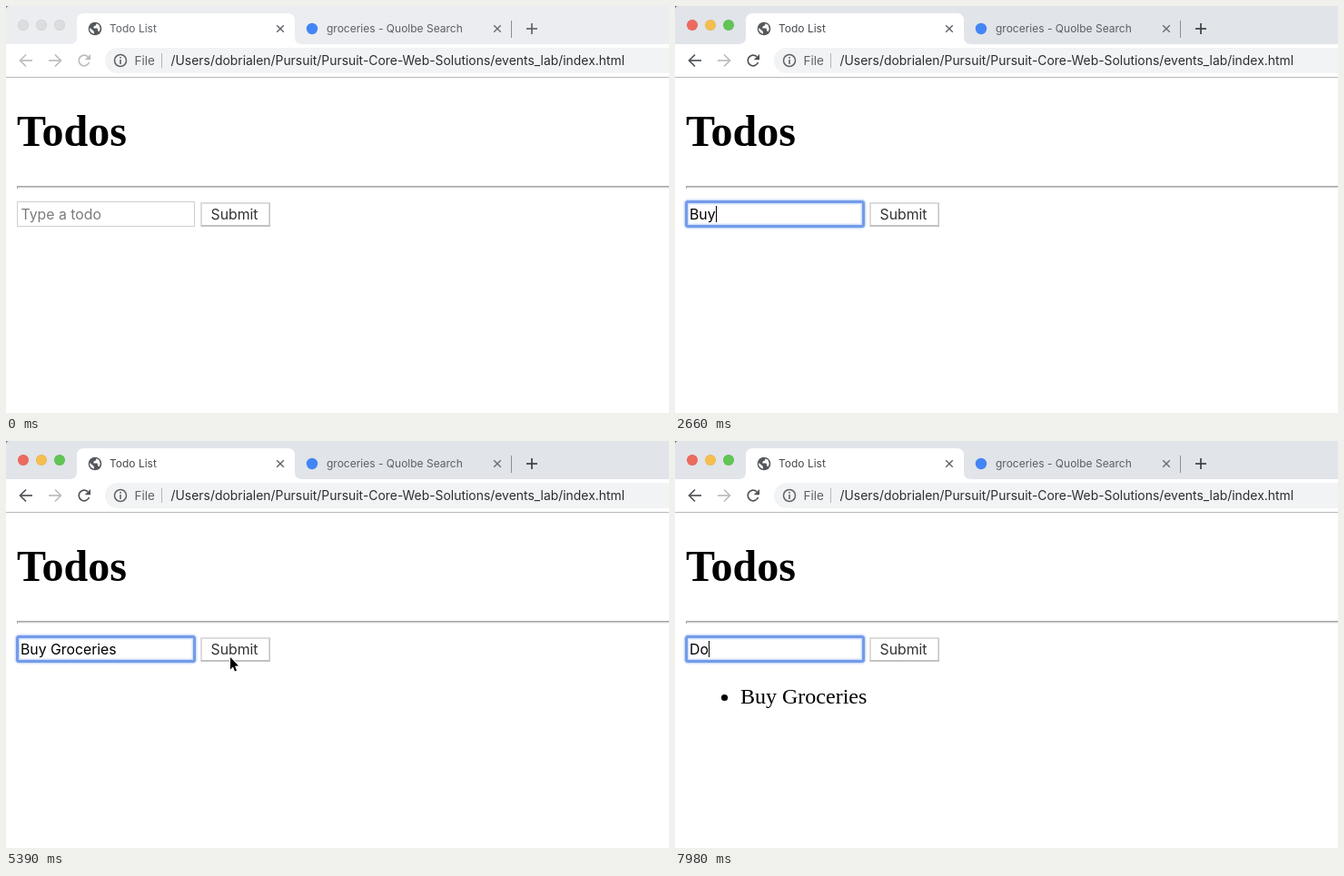
An HTML page with a canvas for the animation above (8 s loop, 730 px wide and 448 px high).

```html
<!DOCTYPE html>
<html lang="en">
<head>
<meta charset="utf-8">
<title>Todo List</title>
<style>
  html, body { margin: 0; width: 100%; height: 100%; overflow: hidden; background: #fff; }
  canvas { display: block; }
</style>
</head>
<body>
<canvas id="stage" width="730" height="448"></canvas>
<script>
const ctx = document.getElementById('stage').getContext('2d');
const LOOP = 8000, STEP = 70;
const SANS = 'Inter, Roboto, sans-serif';
const SERIF = '"Liberation Serif", serif';
const FIELD_FONT = '15.8px ' + SANS;

// Moments of the story, in ms
const ACTIVATE = 840, FOCUS = 1260, PRESS = 5460, SUBMIT = 5530, REFOCUS = 6230;
const FIRST = { text: 'Buy Groceries',
  at: [1820, 2100, 2380, 2800, 3010, 3220, 3430, 3780, 3990, 4130, 4270, 4410, 4550] };
const SECOND = { text: 'Do', at: [7560, 7840] };

// Pointer: time, x, y
const PATH = [
  [70, 600, 414], [280, 575, 285], [420, 568, 283], [770, 134, 226],
  [4760, 134, 226], [5250, 247, 238], [5600, 247, 238], [5880, 188, 237], [6160, 140, 233]
];

function text(str, x, y, font, color) {
  ctx.font = font;
  ctx.fillStyle = color;
  ctx.fillText(str, x, y);
}

function rect(x, y, w, h, color) {
  ctx.fillStyle = color;
  ctx.fillRect(x, y, w, h);
}

function disc(x, y, r, color) {
  ctx.fillStyle = color;
  ctx.beginPath();
  ctx.arc(x, y, r, 0, Math.PI * 2);
  ctx.fill();
}

function line(points, color, width) {
  ctx.strokeStyle = color;
  ctx.lineWidth = width;
  ctx.beginPath();
  points.forEach(([x, y]) => ctx.lineTo(x, y));
  ctx.stroke();
}

function polygon(points, color) {
  ctx.fillStyle = color;
  ctx.beginPath();
  points.forEach(([x, y]) => ctx.lineTo(x, y));
  ctx.closePath();
  ctx.fill();
}

function roundStroke(x, y, w, h, r, width, color) {
  ctx.strokeStyle = color;
  ctx.lineWidth = width;
  ctx.beginPath();
  ctx.roundRect(x, y, w, h, r);
  ctx.stroke();
}

function cross(x, y, color) {
  line([[x - 3.8, y - 3.8], [x + 3.8, y + 3.8]], color, 1.4);
  line([[x - 3.8, y + 3.8], [x + 3.8, y - 3.8]], color, 1.4);
}

function navArrow(x, y, dir, color) {
  line([[x - 7 * dir, y], [x + 6 * dir, y]], color, 1.7);
  line([[x, y - 6.5], [x + 6.5 * dir, y], [x, y + 6.5]], color, 1.7);
}

function reload(x, y, color) {
  ctx.strokeStyle = color;
  ctx.lineWidth = 1.7;
  ctx.beginPath();
  ctx.arc(x, y, 5.8, 0.35, Math.PI * 1.74);
  ctx.stroke();
  polygon([[x + 7, y - 7], [x + 7, y - 0.7], [x + 0.7, y - 0.7]], color);
}

function globe(x, y, color) {
  disc(x, y, 7.3, color);
  polygon([[x - 5.7, y - 1], [x - 2.2, y + 2], [x - 1, y + 3.4], [x - 1, y + 5.8],
    [x - 4, y + 4.2], [x - 5.8, y + 1.5]], '#fff');
  polygon([[x + 1.2, y - 5.8], [x + 1.2, y - 3.8], [x - 1.4, y - 2.6], [x - 1.6, y - 0.6],
    [x + 2.6, y - 0.4], [x + 3.2, y + 2.4], [x + 4.6, y + 3.2], [x + 5.8, y],
    [x + 4.4, y - 4.2]], '#fff');
}

function trafficLights(active) {
  const colors = active ? ['#ec6a5e', '#f4bf4f', '#61c554'] : ['#dcdddf', '#dcdddf', '#dcdddf'];
  const edges = active ? ['#e2635a', '#e6b450', '#5dba52'] : ['#cecfd1', '#cecfd1', '#cecfd1'];
  colors.forEach((color, i) => {
    disc(19 + i * 20, 21, 6, edges[i]);
    disc(19 + i * 20, 21, 5.4, color);
  });
}

function activeTab() {
  ctx.fillStyle = '#fff';
  ctx.beginPath();
  ctx.moveTo(70, 42);
  ctx.quadraticCurveTo(78, 42, 78, 34);
  ctx.lineTo(78, 16);
  ctx.quadraticCurveTo(78, 8, 86, 8);
  ctx.lineTo(310, 8);
  ctx.quadraticCurveTo(318, 8, 318, 16);
  ctx.lineTo(318, 34);
  ctx.quadraticCurveTo(318, 42, 326, 42);
  ctx.fill();
}

function browser(active) {
  const dark = active ? '#3c4043' : '#5f6368';
  const nav = active ? '#505357' : '#babcbe';
  rect(0, 0, 730, 42, active ? '#e1e4e9' : '#ebedf0');
  polygon([[0, 0], [3, 0], [1, 1], [0, 3]], '#77797c');
  trafficLights(active);
  activeTab();

  globe(98, 25, '#55585c');
  text('Todo List', 114, 29, '12px ' + SANS, active ? '#45494d' : '#5f6368');
  cross(302, 25, '#5f6368');
  disc(337, 25, 6.2, '#4285f4');
  text('groceries - Quolbe Search', 353, 29, '12px ' + SANS, '#5b5f64');
  cross(541, 25, '#6a6d71');
  rect(556, 16, 1, 19, '#8b8e93');
  line([[573, 25], [585, 25]], dark, 1.7);
  line([[579, 19], [579, 31]], dark, 1.7);

  navArrow(22, 60, -1, nav);
  navArrow(54, 60, 1, '#babcbe');
  reload(86, 60, nav);
  ctx.fillStyle = '#f1f3f4';
  ctx.beginPath();
  ctx.roundRect(109, 46, 660, 28, 14);
  ctx.fill();
  roundStroke(119.5, 53.5, 13, 13, 6.5, 1.5, '#5f6368');
  rect(125.2, 59, 1.6, 5, '#5f6368');
  rect(125.2, 56, 1.6, 1.7, '#5f6368');
  text('File', 141.5, 65, '13.5px ' + SANS, '#5f6368');
  rect(171, 52, 1, 16, '#b4b7bb');
  text('/Users/dobrialen/Pursuit/Pursuit-Core-Web-Solutions/events_lab/index.html',
    181.5, 65, '13.92px ' + SANS, '#2b2e31');
  rect(0, 78, 730, 1, '#b8b8b8');
}

function typed(entry, t) {
  return entry.text.slice(0, entry.at.filter(at => at <= t).length);
}

function inputState(t) {
  const second = t >= SUBMIT;
  const entry = second ? SECOND : FIRST;
  const start = second ? REFOCUS : FOCUS;
  const lastKey = Math.max(start, ...entry.at.filter(at => at <= t));
  const focused = t >= start && !(t >= PRESS && t < SUBMIT);
  return {
    value: typed(entry, t),
    focused,
    ring: Math.min(1, (t - start + STEP) / (3 * STEP)),
    // The caret gives way while the pointer is in use
    caret: focused && (t < 4760 || second) && Math.floor((t - lastKey) / 500) % 2 === 0
  };
}

function inputField(state) {
  rect(12, 215, 196, 28, '#fff');
  roundStroke(12.5, 215.5, 195, 27, 0, 1, '#cfcfcf');
  if (state.focused) {
    ctx.globalAlpha = state.ring;
    roundStroke(12.5, 215.5, 195, 27, 2, 6, 'rgba(125, 165, 245, 0.35)');
    roundStroke(12.5, 215.5, 195, 27, 2, 3, '#739be8');
    ctx.globalAlpha = 1;
  }
  if (state.value) text(state.value, 16, 235, FIELD_FONT, '#000');
  else text('Type a todo', 16.5, 235, FIELD_FONT, '#7b7b7b');
  if (state.caret) {
    ctx.font = FIELD_FONT;
    rect(Math.round(16 + ctx.measureText(state.value).width), 220, 1, 18, '#000');
  }
}

function submitButton(focused) {
  rect(214, 216, 77, 27, '#dcdcdc');
  rect(290, 217, 1, 26, '#c6c6c6');
  rect(215, 241, 76, 2, '#c2c2c2');
  rect(216, 218, 73, 23, '#fff');
  if (focused) {
    roundStroke(213, 214.5, 79.5, 30, 3, 6, 'rgba(125, 165, 245, 0.4)');
    roundStroke(213, 214.5, 79.5, 30, 3, 4, '#8aacf0');
  }
  text('Submit', 225.5, 235, FIELD_FONT, '#333');
}

function page(t) {
  text('Todos', 12, 154, 'bold 48px ' + SERIF, '#000');
  rect(12, 198, 718, 1, '#a6a2a6');
  rect(12, 199, 718, 1, '#cfcdcf');
  rect(12, 200, 718, 1, '#f3f3f3');
  rect(12, 198, 1, 3, '#a6a2a6');
  inputField(inputState(t));
  submitButton(t >= PRESS && t < REFOCUS);
  if (t >= SUBMIT) {
    disc(54.5, 282.5, 3.6, '#000');
    text(FIRST.text, 72, 289, '24px ' + SERIF, '#000');
  }
}

function pointerAt(t) {
  const next = PATH.findIndex(key => key[0] > t);
  if (next < 0) return PATH[PATH.length - 1].slice(1);
  const [t0, x0, y0] = PATH[next - 1];
  const [t1, x1, y1] = PATH[next];
  const u = (t - t0) / (t1 - t0);
  const k = u * u * (3 - 2 * u);
  return [Math.round(x0 + (x1 - x0) * k), Math.round(y0 + (y1 - y0) * k)];
}

function arrowPointer(x, y) {
  const shape = [[0, 0], [0, 13.4], [3, 10.6], [5, 15.4], [7, 14.5], [5, 9.8], [9, 9.5]];
  const points = shape.map(([dx, dy]) => [x + dx, y + dy]);
  line([...points, points[0]], '#fff', 2);
  polygon(points, '#000');
}

function beamPointer(x, y) {
  for (const [color, width] of [['#fff', 3], ['#111', 1.2]]) {
    const cx = x + 0.5;
    line([[cx, y - 6], [cx, y + 6]], color, width);
    for (const s of [-1, 1]) {
      line([[cx - 3.5, y + 7.5 * s], [cx - 1.5, y + 7.2 * s], [cx, y + 6 * s],
        [cx + 1.5, y + 7.2 * s], [cx + 3.5, y + 7.5 * s]], color, width);
    }
    line([[cx - 2, y + 2.5], [cx + 2, y + 2.5]], color, 1);
  }
}

function pointer(t) {
  const typing = (t >= FIRST.at[0] && t < 4760) || t >= SECOND.at[0];
  if (t < PATH[0][0] || typing) return;
  const [x, y] = pointerAt(t);
  const overInput = x >= 12 && x < 208 && y >= 215 && y < 243;
  if (t >= FOCUS && overInput) beamPointer(x, y);
  else arrowPointer(x, y);
}

function draw(now) {
  const t = Math.floor((now % LOOP) / STEP) * STEP;
  rect(0, 0, 730, 448, '#fff');
  browser(t >= ACTIVATE);
  page(t);
  pointer(t);
}

let start;
function frame(now) {
  start ??= now;
  draw(now - start);
  requestAnimationFrame(frame);
}
draw(0);
requestAnimationFrame(frame);
</script>
</body>
</html>
```
